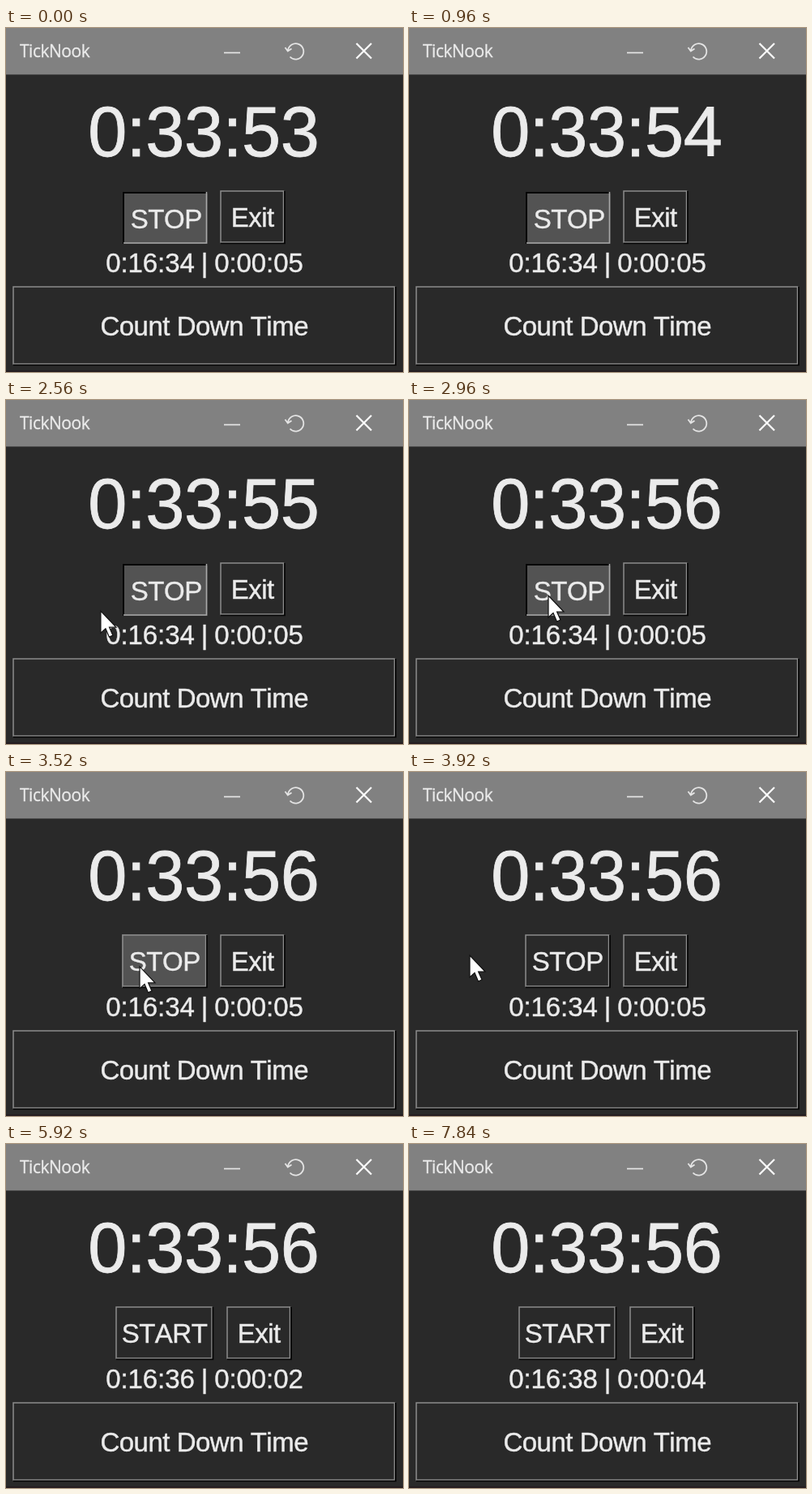
Recreate the animation shown at these times as an HTML page. Size 490x424 px, loop 8000 ms.

```html
<!DOCTYPE html>
<html lang="en">
<head>
<meta charset="utf-8">
<title>Timer</title>
<style>
  html, body { margin: 0; width: 100%; height: 100%; overflow: hidden; background: #292929; }
  svg { display: block; width: 490px; height: 424px; }
  text {
    font: 33px "Liberation Sans", Arial, sans-serif; font-kerning: none; letter-spacing: -.5px;
    fill: #ebebeb; stroke: #ebebeb; stroke-width: .45px; text-anchor: middle;
  }
  #clock { font-size: 86.5px; stroke-width: .8px; }
  #totals { letter-spacing: -.1px; word-spacing: -1px; }
  #title { font: 21px "Open Sans", sans-serif; text-anchor: start; stroke-width: .3px; }
  path { fill: none; }
</style>
</head>
<body>
<svg viewBox="0 0 490 424">
  <rect width="490" height="424" fill="#292929"/>
  <rect width="490" height="57.4" fill="#818181"/>
  <rect y="422" width="490" height="2" fill="#251d20"/>
  <text id="title" x="17" y="36">TickNook</text>
  <path d="M269 30.5H289" stroke="#e6e6e6" stroke-width="1.7"/>
  <path d="M348 27.5A9.7 9.7 0 1 1 350.5 35.5M344.5 24L347.8 28.6L352.5 25.5" stroke="#e4e4e4" stroke-width="1.8"/>
  <path d="M432.5 19L451 37.5M451 19L432.5 37.5" stroke="#fff" stroke-width="2.2"/>
  <text id="clock" x="243.7" y="158"></text>
  <g id="toggle"></g>
  <g id="exit"></g>
  <text id="totals" x="245" y="301"></text>
  <g id="mode"></g>
  <path id="cursor" d="M0 0V27L6 21.5L10.5 32L15 30L10.6 20H19Z" style="fill:#fff" stroke="#111" stroke-width="1.2"/>
</svg>
<script>
const LOOP = 8000, STEP = 80;
const RELEASE = 3280, PAUSED = 4000;
const el = id => document.getElementById(id);

function button(id, label, x, y, w, h, baseline, sunken = false, lit = false) {
  const r = x + w, b = y + h, shift = sunken ? 2 : 0;
  const edges = sunken
    ? `<path d="M${x + 2} ${b}V${y + 3}H${r}" stroke="#050505" stroke-width="2"/>
       <path d="M${x + 2} ${b - 1}H${r - 1}V${y + 2}" stroke="#a8a8a8" stroke-width="1.6"/>`
    : `<path d="M${x + 1} ${y + 1}H${r - 2}V${b - 2}H${x + 1}Z" stroke="#8c8c8c" stroke-width="1.5"/>
       <path d="M${x + 1} ${b - .5}H${r - .5}V${y + 1}" stroke="#050505" stroke-width="1.7"/>`;
  el(id).innerHTML =
    `<rect x="${x + shift}" y="${y + shift}" width="${w - shift}" height="${h - shift}" fill="${lit ? '#535353' : '#292929'}"/>${edges}
     <text x="${x + w / 2 + shift}" y="${baseline + shift}">${label}</text>`;
}

// Eases in from the lower left, rests on the button, then speeds off to the left.
function cursorAt(t) {
  if (t < 2320 || t >= 4160) return null;
  if (t < 3360) {
    const left = (1 - Math.min(1, (t - 2320) / 640)) ** 2;
    return [172 - 141 * left, 241 + 49 * left];
  }
  const away = ((t - 3360) / 560) ** 2.1;
  return [172 - 97 * away, 241 - 15 * away];
}

const passed = (t, ...times) => times.filter(time => t >= time).length;
let last = -1;

function render(t) {
  const cursor = cursorAt(t);
  const paused = t >= PAUSED;
  el('clock').textContent = '0:33:' + (53 + passed(t, 960, 2000, 2960));

  const rest = passed(t, PAUSED, 4960, 6080, 6960);
  el('totals').textContent = `0:16:${34 + rest} | 0:00:0${rest || 5}`;

  if (paused) {
    button('toggle', 'START', 135, 200, 121, 66, 244.6);
  } else {
    const lit = t < RELEASE || cursor[0] >= 144;
    button('toggle', 'STOP', 143, 200, 105.5, 66, 244.6, t < RELEASE, lit);
  }
  button('exit', 'Exit', paused ? 272 : 264, 200, 80.5, 66, 244.6);

  el('cursor').style.display = cursor ? '' : 'none';
  if (cursor) el('cursor').setAttribute('transform', `translate(${cursor})`);
}

function frame() {
  const t = Math.floor(performance.now() % LOOP / STEP) * STEP;
  if (t !== last) render(last = t);
  requestAnimationFrame(frame);
}

button('mode', 'Count Down Time', 8, 318, 473.5, 98, 379);
frame();
</script>
</body>
</html>
```
